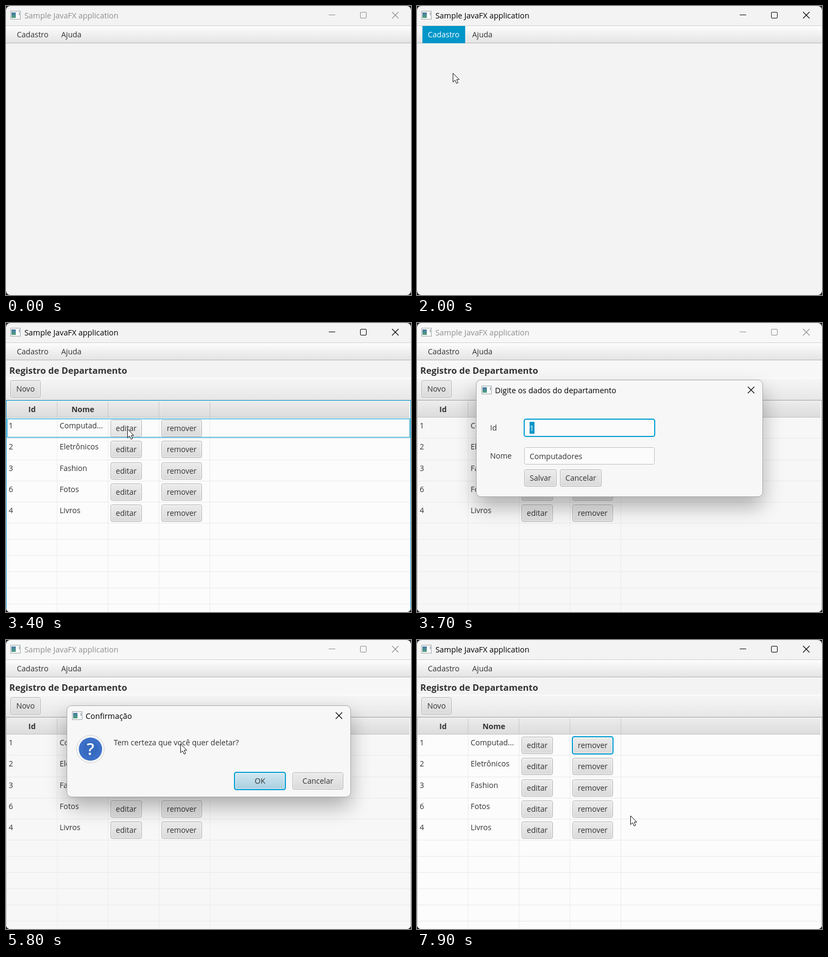
These frames come from a looping animation (748 by 535 pixels, 8 s). An HTML page:

```html
<!DOCTYPE html>
<html lang="pt">
<head>
<meta charset="utf-8">
<title>Registro de Departamento</title>
<style>
  html, body { margin: 0; width: 100%; height: 100%; overflow: hidden; background: #202020; }
  svg { display: block; width: 748px; height: 535px; }
  text { font: 14px "Open Sans", "Noto Sans", sans-serif; fill: #333; white-space: pre; }
  .caption { font-size: 14.35px; }
  .bold { font-weight: 700; }
  .heading { font-weight: 700; font-size: 16.5px; }
  .mid { text-anchor: middle; }
</style>
</head>
<body>
<svg viewBox="0 0 748 535" xmlns="http://www.w3.org/2000/svg">
  <defs id="defs"></defs>
  <g id="stage" clip-path="url(#window)"></g>
</svg>
<script>
const LOOP = 8000, STEP = 100;
const BLUE = '#0096c9', RING = '#039ed3', GRAY = '#b5b5b5';

const gradient = (id, ...colors) =>
  `<linearGradient id="${id}" x2="0" y2="1">${colors.map((c, i) =>
    `<stop offset="${i / (colors.length - 1)}" stop-color="${c}"/>`).join('')}</linearGradient>`;

document.getElementById('defs').innerHTML =
  gradient('bar', '#fdfdfd', '#f0f0f0', '#e4e4e4') +
  gradient('tools', '#f6f6f6', '#efefef', '#e7e7e7') +
  gradient('head', '#ececec', '#e4e4e4', '#dcdcdc') +
  gradient('normal', '#ebebeb', '#e3e3e3', '#d9d9d9') +
  gradient('hover', '#f3f3f3', '#ebebeb', '#e1e1e1') +
  gradient('pressed', '#d2d2d2', '#cbcbcb', '#c2c2c2') +
  gradient('default', '#d3e8f1', '#bddbe8', '#a6cddf') +
  gradient('defaultPressed', '#b3d3e0', '#a2c8d8', '#8fbacd') +
  gradient('screen', '#4779a8', '#4fa07c') +
  `<clipPath id="window"><rect width="748" height="535" rx="8"/></clipPath>
   <filter id="soft" x="-20%" y="-40%" width="140%" height="190%"><feGaussianBlur stdDeviation="19"/></filter>
   <filter id="popup" x="-20%" y="-20%" width="140%" height="150%"><feGaussianBlur stdDeviation="4"/></filter>`;

const rect = (x, y, w, h, fill, extra = '') =>
  `<rect x="${x}" y="${y}" width="${w}" height="${h}" fill="${fill}" ${extra}/>`;
const frame = (x, y, w, h, stroke, fill = 'none', rx = 0, sw = 1) =>
  rect(x + sw / 2, y + sw / 2, w - sw, h - sw, fill, `stroke="${stroke}" stroke-width="${sw}" rx="${rx}"`);
const text = (x, y, s, cls = '', fill = '') =>
  `<text x="${x}" y="${y}" class="${cls}" ${fill && `style="fill:${fill}"`}>${s}</text>`;
const stroke = (d, color, sw = 1) =>
  `<path d="${d}" fill="none" stroke="${color}" stroke-width="${sw}"/>`;

const appIcon = (x, y) =>
  frame(x, y, 19, 16, '#a3a9ac', '#f6f6f6') + rect(x + 2, y + 3, 8, 10, 'url(#screen)') +
  rect(x + 11, y + 3, 4, 11, '#fff') + rect(x + 16, y + 3, 1, 5, '#5f7f92');

const closeMark = (x, y, color) =>
  stroke(`M${x} ${y}l12 12m0 -12l-12 12`, color, 1.2);

const inside = (p, x, y, w, h) =>
  p && p[0] >= x && p[0] < x + w && p[1] >= y && p[1] < y + h;

function button(x, y, w, label, { fill = 'normal', focus = false } = {}) {
  const h = 32;
  const edge = focus
    ? frame(x - 1, y - 1, w + 2, h + 2, RING, `url(#${fill})`, 3.5, 2)
    : frame(x, y, w, h, GRAY, `url(#${fill})`, 3);
  return edge + frame(x + 1.5, y + 1.5, w - 3, h - 3, 'rgba(255,255,255,.5)', 'none', 2) +
    text(x + w / 2, y + 21, label, 'mid');
}

// Pointer stops: [time, x, y]
const pointerPath = [
  [400, 64, 2], [700, 55, 52], [1300, 55, 52], [1700, 66, 124], [2700, 66, 124],
  [3400, 224, 196], [4000, 224, 196], [4300, 228, 300], [4900, 228, 300],
  [5400, 322, 192], [5800, 322, 192], [6700, 468, 268], [7200, 468, 268], [7900, 394, 325]
];

function pointerAt(t) {
  if (t < 400) return null;
  const i = pointerPath.findIndex(s => s[0] > t);
  if (i < 0) return pointerPath.at(-1).slice(1);
  const [t0, x0, y0] = pointerPath[i - 1], [t1, x1, y1] = pointerPath[i];
  const k = (t - t0) / (t1 - t0), e = k * k * (3 - 2 * k);
  return [Math.round(x0 + (x1 - x0) * e), Math.round(y0 + (y1 - y0) * e)];
}

const pointer = ([x, y]) =>
  `<path transform="translate(${x + .5} ${y + .5})" d="M0 0V16.2L3.7 12.7 6.5 18.8 9.3 17.5 6.6 11.6H11.5Z" fill="#fff" stroke="#111"/>`;

function chrome(active, modal, menuLit) {
  const ink = active ? '#000' : '#8e8e8e';
  return rect(0, 0, 748, 535, modal ? '#f7f7f7' : '#f3f3f3') +
    appIcon(8, 9) + text(34, 23, 'Sample JavaFX application', 'caption', ink) +
    stroke('M596 16.5h12', ink) + frame(654, 11, 12, 12, ink, 'none', 1.5) + closeMark(713, 11, ink) +
    rect(0, 36, 748, 1, '#cfcfcf') + rect(0, 37, 748, 31, 'url(#bar)') + rect(0, 68, 748, 1, GRAY) +
    (menuLit ? rect(10, 37, 79, 32, BLUE) : '') +
    text(20, 58, 'Cadastro', '', menuLit ? '#fff' : '') + text(102, 58, 'Ajuda');
}

function menu(p) {
  const item = (y, label) => {
    const lit = inside(p, 11, y, 116, 32);
    return (lit ? rect(11, y, 116, 32, BLUE) : '') + text(17, y + 21, label, '', lit ? '#fff' : '');
  };
  return rect(12, 76, 114, 72, '#000', 'opacity=".38" filter="url(#popup)"') +
    frame(10, 69, 118, 74, '#a9a9a9', '#fff') + item(74, 'Vendedor') + item(106, 'Departamento');
}

const departments = [[1, 'Computad...'], [2, 'Eletrônicos'], [3, 'Fashion'], [6, 'Fotos'], [4, 'Livros']];
const columns = [94, 188, 282, 376];

function table(t, p, modal) {
  const focused = t < 3500;
  const look = (x, y, w, pressed) =>
    pressed ? 'pressed' : !modal && inside(p, x, y, w, 32) ? 'hover' : 'normal';
  let out = text(6, 94, 'Registro de Departamento', 'heading') +
    rect(0, 101, 748, 41, 'url(#tools)') + rect(0, 101, 748, 2, '#fbfbfb') + rect(0, 142, 748, 1, '#c4c4c4') +
    button(8, 106, 56, 'Novo', { fill: look(8, 106, 56) }) +
    rect(0, 143, 748, 392, modal ? '#f7f7f7' : '#fcfcfc') +
    rect(1, 145, 744, 29, 'url(#head)') + rect(1, 174, 744, 1, '#c4c4c4');
  for (const x of columns) out += rect(x, 146, 1, 28, '#c8c8c8') + rect(x, 175, 1, 360, '#ebebeb');
  out += text(48, 165, 'Id', 'bold mid') + text(142, 165, 'Nome', 'bold mid');
  for (let i = 1; i <= 10; i++) {
    const y = i <= 5 ? 174 + 39.25 * i : 370 + 30 * (i - 5);
    out += rect(1, Math.round(y), 746, 1, '#e9e9e9');
  }
  if (focused) out += frame(1.5, 176.5, 745, 36, '#4bb5de', 'none', 0, 1.7);
  departments.forEach(([id, name], i) => {
    const y = Math.round(179 + 39.25 * i), first = i === 0;
    const edit = first && t >= 3500 && t < 4900, remove = first && t >= 5600;
    out += text(5, y + 16, id) + text(99, y + 16, name) +
      button(193, y, 58, 'editar', { fill: look(193, y, 58, edit && t < 3700), focus: edit }) +
      button(287, y, 75, 'remover', { fill: look(287, y, 75, remove && t < 5700), focus: remove });
  });
  return out + frame(0, 143, 748, 394, focused ? RING : '#bdbdbd');
}

const dialog = (x, y, w, h, title) =>
  rect(x, y + 18, w, h, '#000', 'rx="8" opacity=".3" filter="url(#soft)"') +
  frame(x - 1, y - 1, w + 2, h + 2, '#a8a8a8', '#f7f7f7', 8.5) +
  appIcon(x + 9, y + 10) + text(x + 34, y + 24, title, 'caption', '#000') + closeMark(x + w - 27, y + 12, '#000');

function editDialog(t, p) {
  const saving = t >= 4600;
  const lit = t >= 4100 && inside(p, 198, 271, 60, 33);
  return dialog(110, 106, 528, 215, 'Digite os dados do departamento') +
    text(135, 199, 'Id') + text(135, 251, 'Nome') +
    (saving ? frame(198, 178, 241, 32, '#c0c0c0', '#fbfbfb', 3)
            : frame(197, 177, 243, 34, RING, '#fbfbfb', 3.5, 2) + rect(208, 183, 9, 22, BLUE)) +
    text(208, 200, '1', '', saving ? '' : '#fff') +
    frame(198, 230, 241, 32, '#c0c0c0', '#fbfbfb', 3) + text(208, 252, 'Computadores') +
    button(198, 271, 60, 'Salvar', { fill: t === 4600 ? 'pressed' : lit ? 'hover' : 'normal', focus: saving }) +
    button(264, 271, 77, 'Cancelar');
}

function confirmDialog(t) {
  return dialog(113, 122, 523, 168, 'Confirmação') +
    '<circle cx="156" cy="202" r="25.5" fill="#f8f8f8" stroke="#cfcfcf"/>' +
    '<circle cx="156" cy="202" r="21.5" fill="#3c70c8"/><circle cx="156" cy="202" r="14" fill="#366ac0"/>' +
    '<text x="156" y="213" class="mid" style="font-size:31px;font-weight:600;fill:#f4f7fb">?</text>' +
    text(199, 195, 'Tem certeza que você quer deletar?') +
    button(422, 245, 94, 'OK', { fill: t === 6900 ? 'defaultPressed' : 'default', focus: true }) +
    button(529, 245, 94, 'Cancelar');
}

function scene(t) {
  const p = pointerAt(t);
  const editing = t >= 3700 && t < 4900, confirming = t >= 5800 && t < 7200;
  const modal = editing || confirming;
  const menuLit = (t >= 900 && t < 2500) || (t < 900 && inside(p, 10, 37, 79, 32));
  const pointerHidden = !p || (t >= 3700 && t < 4100);
  return chrome(t >= 900 && !modal, modal, menuLit) +
    (t >= 900 && t < 2000 ? menu(p) : '') +
    (t >= 2500 ? table(t, p, modal) : '') +
    (editing ? editDialog(t, p) : '') +
    (confirming ? confirmDialog(t) : '') +
    (pointerHidden ? '' : pointer(p));
}

const stage = document.getElementById('stage');
const start = performance.now();
let shown = -1;

function tick() {
  const t = Math.floor(((performance.now() - start) % LOOP) / STEP) * STEP;
  if (t !== shown) stage.innerHTML = scene(shown = t);
  requestAnimationFrame(tick);
}
tick();
</script>
</body>
</html>
```
